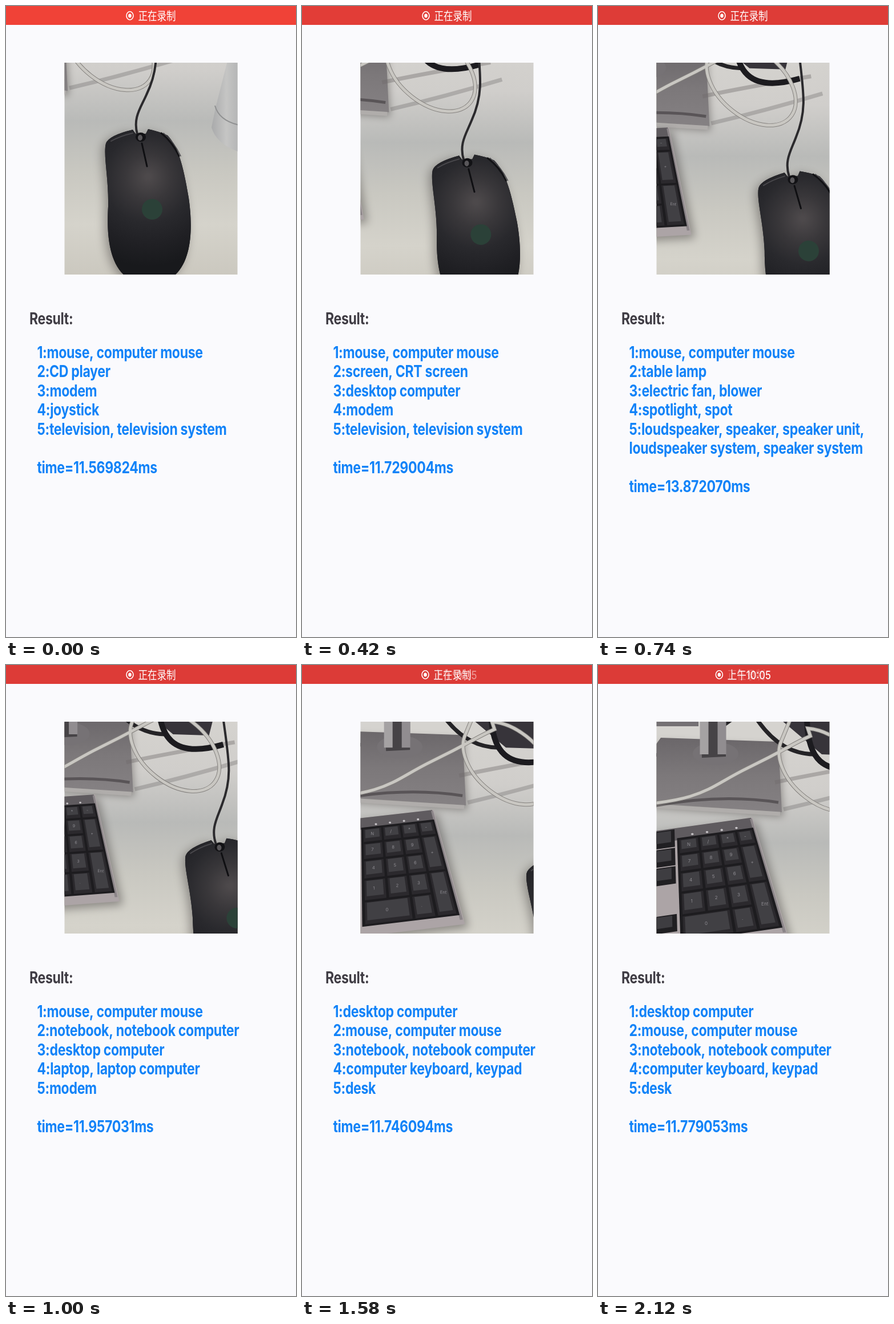
An HTML page with a canvas that plays this animation: 508 by 1102 pixels, repeating every 2.14 s.

```html
<!DOCTYPE html>
<html lang="en">
<head>
<meta charset="utf-8">
<title>Live classification</title>
<style>
  html, body { margin: 0; width: 100%; height: 100%; overflow: hidden; background: #fafafd; }
  canvas { display: block; width: 508px; height: 1102px; }
</style>
</head>
<body>
<canvas id="stage" width="508" height="1102"></canvas>
<script>
const ctx = document.getElementById('stage').getContext('2d');
const LOOP = 2140, LAST_STEP = 46;
const PAN_X = 246, PAN_Y = 125;
const TURN = 0.0006; // camera roll in radians per pixel of pan
const SQUEEZE = 0.824;
const FONT = '"Inter", "Noto Sans CJK SC", "Noto Sans CJK", sans-serif';

const MOUSE = 'mouse, computer mouse';
const TV = 'television, television system';
const SPEAKER = 'loudspeaker, speaker, speaker unit,\nloudspeaker system, speaker system';
const NOTEBOOK = 'notebook, notebook computer';
const DESK_SET = ['desktop computer', MOUSE, NOTEBOOK, 'computer keyboard, keypad', 'desk'];
const READINGS = [
  { from: 0, time: '11.569824', labels: [MOUSE, 'CD player', 'modem', 'joystick', TV] },
  { from: 4, time: '11.840088', labels: [MOUSE, 'joystick', SPEAKER, 'CD player', 'modem'] },
  { from: 7, time: '11.729004', labels: [MOUSE, 'screen, CRT screen', 'desktop computer', 'modem', TV] },
  { from: 13, time: '13.872070', labels: [MOUSE, 'table lamp', 'electric fan, blower', 'spotlight, spot', SPEAKER] },
  { from: 21, time: '11.957031', labels: [MOUSE, NOTEBOOK, 'desktop computer', 'laptop, laptop computer', 'modem'] },
  { from: 31, time: '11.746094', labels: DESK_SET },
  { from: 37, time: '11.663086', labels: DESK_SET },
  { from: 43, time: '11.779053', labels: DESK_SET }
];

const WHITE_CABLE = new Path2D('M50 246C190 236 190 215 262 180S340 138 372 124');
WHITE_CABLE.ellipse(395, 183, 90, 57, 0.7, -2.42, 2.98);
WHITE_CABLE.lineTo(338, 92);
const BLACK_LOOP = new Path2D('M366 90C366 160 390 200 480 174');
const BLACK_LEAD = new Path2D('M272 85Q315 155 378 156');
const REAR_LEAD = new Path2D('M80 158C150 158 180 135 235 95');
const MOUSE_LEAD = new Path2D('M230 224C222 195 236 178 246 155C268 110 264 80 260 10');
const MOUSE_BODY = new Path2D('M222 216Q180 226 175 240C170 260 180 300 179 350C176 400 178 486 252 486' +
  'C330 484 328 390 320 335C310 275 301 245 283 226Q268 219 249 215L245 223H227Z');

// Steps last 20, 20 and 100 ms in turn.
function stepAt(t) {
  const rest = t % 140;
  return 3 * Math.floor(t / 140) + (rest < 20 ? 0 : rest < 40 ? 1 : 2);
}

// The pan slows down as it reaches the keyboard.
function cameraAt(n) {
  const p = n / LAST_STEP;
  return [-PAN_X * (1 - p) * (1 - 0.6 * p ** 2.3), -PAN_Y * (1 - p) ** (2.05 - 0.65 * p)];
}

function layer(x, y, draw) {
  ctx.save();
  ctx.translate(x, y);
  draw();
  ctx.restore();
}

function poly(fill, ...pts) {
  ctx.beginPath();
  pts.forEach(p => ctx.lineTo(...p));
  ctx.fillStyle = fill;
  ctx.fill();
}

function blob(fill, x, y, rx, ry = rx) {
  ctx.beginPath();
  ctx.ellipse(x, y, rx, ry, 0, 0, 7);
  ctx.fillStyle = fill;
  ctx.fill();
}

function line(color, width, path) {
  ctx.strokeStyle = color;
  ctx.lineWidth = width;
  ctx.stroke(typeof path === 'string' ? new Path2D(path) : path);
}

function gradient(g, ...colors) {
  colors.forEach((color, i) => g.addColorStop(i / (colors.length - 1), color));
  return g;
}

function withShadow(blur, x, y, draw) {
  ctx.save();
  ctx.shadowColor = 'rgba(70,66,64,.5)';
  ctx.shadowBlur = blur;
  ctx.shadowOffsetX = x;
  ctx.shadowOffsetY = y;
  draw();
  ctx.restore();
}

function drawDesk(y) {
  ctx.fillStyle = gradient(ctx.createLinearGradient(0, 130 + y, 0, 580 + y),
    '#d5d3cf', '#d0cecb', '#b9bab8', '#c9c8c1', '#d5d3cb', '#cbc8bf');
  ctx.fillRect(102, 99, 304, 370);
}

function drawMonitorFoot() {
  poly('#757174', [20, 60], [176, 60], [176, 107], [20, 107]);
  line('#252427', 6, REAR_LEAD);
  withShadow(14, 2, 8, () => poly(gradient(ctx.createLinearGradient(0, 128, 0, 256), '#6b676a', '#7c787a', '#858183'),
    [110, 127], [316, 134], [322, 257], [30, 237]));
  line('#b0adab', 7, 'M30 242L319 260');
  blob('#767275', 206, 155, 40, 20);
  poly('#464346', [178, 60], [224, 60], [224, 160], [182, 162]);
  line('#a5a2a3', 15, 'M186 60V156');
  line('#918d90', 15, 'M217 60V156');
  line('rgba(62,58,61,.6)', 5, 'M60 254Q200 222 316 240');
}

function drawCables() {
  line('rgba(110,106,106,.4)', 7, 'M310 205Q380 190 500 170');
  line('rgba(110,106,106,.35)', 7, 'M325 252Q420 230 520 200');
  poly('#37343a', [316, 92], [340, 60], [480, 60], [455, 158], [392, 156]);
  line('#242326', 7, BLACK_LEAD);
  line('#1c1b1f', 10, BLACK_LOOP);
  line('#85827f', 7, WHITE_CABLE);
  line('#c9c7c2', 5, WHITE_CABLE);
}

// Keypad position (u, v from 0 to 1, beyond that the frame around it) seen in perspective
const cell = (u, v) => [141 + 7 * v + u * (130 + 43 * v), 304 + 178 * v - u * (18 + 7 * v)];
const column = i => i * (0.285 - 0.00875 * i);
const row = i => i * (0.14 + 0.012 * i);

function panel(fill, u0, u1, v0, v1) {
  poly(fill, cell(u0, v0), cell(u1, v0), cell(u1, v1), cell(u0, v1));
}

function key(label, col, line, width = 1, height = 1) {
  const u0 = column(col), u1 = column(col + width);
  const v0 = row(line), v1 = row(line + height);
  panel('#2b292d', u0 + 0.012, u1 - 0.018, v0 + 0.01, v1 - 0.012);
  panel('#414044', u0 + 0.035, u1 - 0.045, v0 + 0.016, v1 - 0.05);
  ctx.fillStyle = 'rgba(205,203,210,.55)';
  ctx.font = '8px ' + FONT;
  ctx.fillText(label, ...cell((u0 + u1) / 2 - 0.03, (v0 + v1) / 2));
}

function drawKeyboard() {
  withShadow(16, 6, 6, () => panel('#aca4a6', -0.9, 1.04, -0.11, 1.11));
  panel('#5f5b5f', -0.9, 1.02, -0.11, 0.01);
  panel('#8b8588', 1, 1.03, -0.1, 1.06);
  panel('#1d1c1f', -0.02, 1.01, -0.01, 1.01);

  ['N/*', '789', '456', '123'].forEach((labels, r) =>
    [...labels].forEach((label, c) => key(label, c, r)));
  key('-', 3, 0);
  key('+', 3, 1, 1, 2);
  key('Ent', 3, 3, 1, 2);
  key('0', 0, 4, 2);
  key('.', 2, 4);

  for (const r of [0, 1, 2, 4.6]) {
    const v = r * 0.18 - 0.1;
    panel('#201f22', -0.7, -0.05, v, v + 0.17);
    panel('#3e3d41', -0.7, -0.1, v + 0.01, v + 0.12);
  }
  for (let i = 0; i < 4; i++) blob('#c8c5c8', ...cell(0.19 + 0.2 * i, -0.03), 2.2, 1.8);
}

function drawMouse() {
  ctx.lineCap = 'round';
  withShadow(18, -5, 4, () => {
    ctx.fillStyle = '#26262a';
    ctx.fill(MOUSE_BODY);
  });
  line('#2b2a2d', 4, MOUSE_LEAD);
  ctx.fillStyle = gradient(ctx.createRadialGradient(249, 298, 4, 249, 305, 150),
    '#4d494b', '#39373a', '#29292d', '#202024', '#18191c');
  ctx.fill(MOUSE_BODY);
  line('#48474b', 2, 'M184 236Q200 227 222 222');
  line('#121215', 3, 'M272 222Q292 238 303 262');
  line('#47464a', 1.5, 'M276 222Q295 238 306 262');
  blob('#121215', 236, 229, 9, 8);
  blob('#59575a', 235, 230, 4, 5);
  line('#0f0f12', 3, 'M238 240L247 280');
  blob('#2b4138', 256, 355, 18);
}

function drawCylinder() {
  ctx.fillStyle = gradient(ctx.createLinearGradient(360, 0, 412, 0), '#a9aaab', '#c5c5c4', '#b0b1b2');
  ctx.fill(new Path2D('M392 80L367 178L360 212Q370 246 420 258V80Z'));
  line('#8f9091', 2, 'M366 174Q374 204 420 210');
}

function drawPhoto(n) {
  const [x, y] = cameraAt(n);
  const travelX = x + PAN_X, travelY = y + PAN_Y;
  ctx.save();
  ctx.beginPath();
  ctx.rect(102.5, 99, 303, 370);
  ctx.clip();
  drawDesk(y * 0.87);
  layer(x * 0.87, y * 0.87, () => { drawMonitorFoot(); drawCables(); });
  layer(268 + x, 264 + y, () => {
    const size = Math.max(0.88, 1 + x * 0.0012);
    ctx.rotate(-x * TURN);
    ctx.scale(size, size);
    ctx.translate(-268, -264);
    drawKeyboard();
  });
  layer(travelX * 1.05, travelY * 1.05, drawCylinder);
  layer(235 + travelX * 1.05, 228 + travelY * 1.05, () => {
    ctx.rotate(-travelX * TURN);
    ctx.translate(-235, -228);
    drawMouse();
  });
  ctx.restore();
}

function text(str, x, y, color, font, spacing = '-0.4px') {
  layer(x, y, () => {
    ctx.scale(SQUEEZE, 1);
    ctx.font = `${font} ${FONT}`;
    ctx.letterSpacing = spacing;
    ctx.fillStyle = color;
    ctx.fillText(str, 0, 0);
  });
}

function drawStatusBar(n) {
  const glow = Math.exp(-n / 8);
  ctx.fillStyle = `rgb(${220 + 20 * glow}, ${59 + 7 * glow}, 55)`;
  ctx.fillRect(0, 0, 508, 33);
  const fade = Math.max(0, Math.min(1, (n - 32) / 15));
  const x = 217 - 5 * fade;
  ctx.beginPath();
  ctx.ellipse(x, 17, 6, 7.2, 0, 0, 7);
  ctx.strokeStyle = '#fff';
  ctx.lineWidth = 1.6;
  ctx.stroke();
  blob('#fff', x, 17, 2.8, 3.6);
  const label = (str, alpha) => text(str, x + 14.5, 24.5, `rgba(255,255,255,${alpha})`, '500 20px', '0px');
  label('正在录制', Math.sqrt(1 - fade));
  label('上午10:05', Math.sqrt(fade));
}

function drawResults(n) {
  const { time, labels } = READINGS.findLast(reading => reading.from <= n);
  const rows = labels.map((label, i) => `${i + 1}:${label}`).join('\n').split('\n');
  rows.push('', `time=${time}ms`);
  text('Result:', 41, 556, '#403d45', '700 28px');
  rows.forEach((str, i) => text(str, 54.5, 615 + i * 33.45, '#1283f8', '700 28px'));
}

function render() {
  const n = stepAt(performance.now() % LOOP);
  ctx.fillStyle = '#fafafd';
  ctx.fillRect(0, 0, 508, 1102);
  drawStatusBar(n);
  drawPhoto(n);
  drawResults(n);
  requestAnimationFrame(render);
}
render();
</script>
</body>
</html>
```
